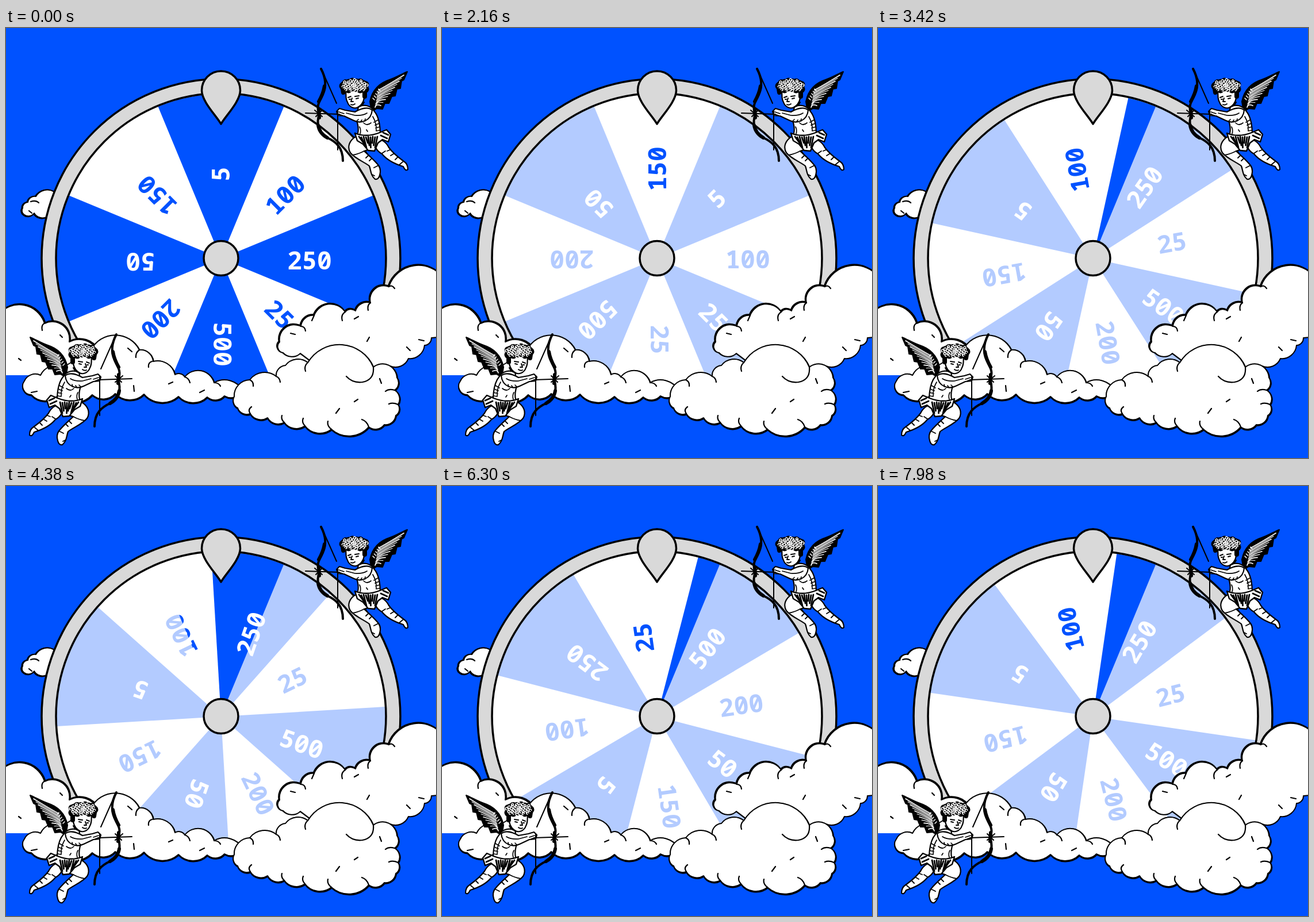
An HTML page for the animation above (8000 ms loop, 748x748 px).

```html
<!DOCTYPE html>
<html lang="en">
<head>
<meta charset="utf-8">
<title>Wheel</title>
<style>
  html, body { margin: 0; width: 100%; height: 100%; overflow: hidden; background: #0052ff; }
  svg { display: block; width: 100vw; height: 100vh; }
  text { font: 600 43px "Noto Sans Mono", monospace; text-anchor: middle; }
  .ink { stroke: #000; stroke-linejoin: round; stroke-linecap: round; }
  .line { fill: none; }
  .skin { fill: #fff; stroke-width: 2.2; }
  .metal { fill: #d9d9d9; stroke: #000; stroke-width: 3.5; }
</style>
</head>
<body>
<svg viewBox="0 0 748 748">
  <defs>
    <clipPath id="aboveClouds"><rect width="748" height="634"/></clipPath>
    <clipPath id="flatBase"><rect width="748" height="604"/></clipPath>
    <g id="cherub" class="ink">
      <g id="wing"></g>
      <!-- far leg, near leg -->
      <path class="skin" d="M640 194C652 191 661 198 666 208C674 219 684 226 692 232Q699 236 699 246Q695 250 691 241C678 237 663 230 654 219C645 214 640 207 640 194Z"/>
      <path class="skin" d="M610 188C597 195 593 207 599 217C607 227 623 233 632 240C635 248 634 256 642 263Q648 264 650 256Q653 246 648 239C640 229 630 221 623 214C635 212 641 201 639 190Z"/>
      <path class="line" stroke-width="1.8" d="M603 221Q614 219 623 214M648 239L640 243M690 233L684 238M654 218L660 214M630 222L626 226M636 227L632 231M668 212L663 214M674 219L669 222M681 225L677 229M637 255L641 257"/>
      <!-- torso -->
      <path class="skin" d="M613 137C623 132 634 135 640 144C648 153 651 169 651 186C640 195 621 196 610 189C615 179 613 169 609 158Z"/>
      <path class="line" stroke-width="1.7" d="M622 165Q628 171 635 165M627 177L629 180M638 154Q645 166 644 178M615 172Q618 177 616 184M647 160L640 164M649 166L642 169M650 172L643 174M650 178L644 179"/>
      <!-- loincloth -->
      <path d="M607 183Q627 191 650 182L662 177L669 185L665 198L655 194L647 200L641 214L630 213L621 202L611 196Z" fill="#fff" stroke-width="2.4"/>
      <path id="folds" class="line" stroke-width="2.8"/>
      <!-- arms -->
      <path class="skin" d="M637 143C629 136 618 140 607 146L590 143L580 140L575 145L577 152L588 153L605 161C617 167 635 162 637 143Z"/>
      <path class="line" stroke-width="1.7" d="M592 148L607 152Q620 153 628 148M579 146L588 149M576 149L585 152M610 162L613 159M617 163L619 160M624 162L625 158"/>
      <!-- head -->
      <path class="skin" d="M591 108C592 116 590 122 594 129C597 138 607 142 614 137Q624 130 624 112L609 102Z"/>
      <path class="line" stroke-width="2" d="M595 121L600 119M607 119L614 118M597 124L599 124M609 123L613 122M602 122L600 128L604 128M600 133Q603 135 607 132M613 137Q620 136 623 129"/>
      <g id="hair"></g>
      <g id="curls" fill="none" stroke="#fff" stroke-width="1.5"></g>
      <!-- bow, string, arrow -->
      <path class="line" stroke-width="4" d="M548 71C555 84 559 99 551 116C545 128 539 136 545 149C540 165 542 180 557 190C573 197 586 207 586 231"/>
      <path class="line" stroke-width="6" d="M554 101Q552 114 544 128M543 169Q545 183 559 191M544 141L545 156"/>
      <path class="line" stroke-width="2" d="M552 79L575 131M577 143L577 212M521 148L580 150M537 143L550 154M539 154L550 143"/>
    </g>
  </defs>
  <rect width="748" height="748" fill="#0052ff"/>
  <g id="backCloud"></g>
  <g clip-path="url(#aboveClouds)">
    <circle class="metal" cx="374" cy="400.500" r="312"/>
    <circle cx="374" cy="400.500" r="287" fill="#fff"/>
    <g transform="translate(0 1)"><g id="wheel"></g></g>
    <path id="veil" fill="#fff" fill-opacity=".7"/>
    <g transform="translate(0 2)" id="labelLayer"></g>
    <circle cx="374" cy="400.500" r="287" fill="none" stroke="#000" stroke-width="3.500"/>
  </g>
  <circle class="metal" cx="374" cy="400.500" r="30"/>
  <path class="metal" stroke-linejoin="round" d="M374 167C367 154 340.500 128 340.500 108.500A33.500 33.500 0 0 1 407.500 108.500C407.500 128 381 154 374 167Z"/>
  <g id="clouds"></g>
  <use href="#cherub"/>
  <use href="#cherub" transform="translate(740 462) scale(-1 1)"/>
</svg>
<script>
const byId = id => document.getElementById(id);
const CX = 374, CY = 400, R = 286;

function add(parent, tag, attrs, text) {
  const el = document.createElementNS('http://www.w3.org/2000/svg', tag);
  for (const k in attrs) el.setAttribute(k, attrs[k]);
  if (text) el.textContent = text;
  return parent.appendChild(el);
}

// Pie slice between two clockwise angles measured from the top.
function slice(from, to) {
  const at = deg => {
    const a = deg * Math.PI / 180;
    return `${CX + R * Math.sin(a)} ${CY - R * Math.cos(a)}`;
  };
  return `M${CX} ${CY}L${at(from)}A${R} ${R} 0 ${+(to - from > 180)} 1 ${at(to)}Z`;
}

// Label, middle radius, sideways shift.
const prizes = [
  ['5', 148, -1], ['100', 158, 0], ['250', 154, 2], ['25', 140, -4],
  ['500', 148, -2], ['200', 148, 0], ['50', 140, -4], ['150', 157, 0]
];
const wheel = byId('wheel');
const labels = add(wheel, 'g', {});
prizes.forEach(([label, radius, shift], i) => {
  const mid = i * 45, blue = i % 2 === 0;
  if (blue) wheel.insertBefore(add(wheel, 'path', { d: slice(mid - 22.5, mid + 22.5), fill: '#0052ff' }), labels);
  add(labels, 'text', {
    y: 15.5, fill: blue ? '#fff' : '#0052ff',
    transform: `rotate(${mid} ${CX} ${CY}) translate(${CX + shift} ${CY - radius}) rotate(-90)`
  }, label);
});
byId('labelLayer').remove();
const veil = byId('veil');
veil.setAttribute('d', slice(22.5, 337.5));

// Cloud outline: bumps between points; "O" is a rounder bump, "L" a straight side.
function bumps(points) {
  let px, py;
  return points.split(' ').map((p, i) => {
    const kind = p.match(/^[LO]/)?.[0];
    const [x, y] = p.replace(/^[LO]/, '').split(',').map(Number);
    const r = (kind === 'O' ? 0.56 : 0.7) * Math.hypot(x - px, y - py);
    px = x; py = y;
    return i === 0 ? `M${x} ${y}` : kind === 'L' ? `L${x} ${y}` : `A${r} ${r} 0 0 1 ${x} ${y}`;
  }).join('') + 'Z';
}

// The offset dark copy makes the outline heavier on one side.
function cloud(parent, points, marks, dx, dy, clip) {
  const g = add(parent, 'g', { class: 'ink', ...(clip && { 'clip-path': `url(#${clip})` }) });
  const d = bumps(points);
  add(g, 'path', { d, 'stroke-width': 3, transform: `translate(${dx} ${dy})` });
  add(g, 'path', { d, fill: '#fff', 'stroke-width': 2 });
  add(g, 'path', { d: marks, fill: 'none', 'stroke-width': 2.2 });
}

cloud(byId('backCloud'), '84,285 L92,325 L72,328 49,322 32,325 29,313 38,303 52,293 84,285',
  'M43 302Q52 299 57 304M40 318L45 322', -1, 0.5);

const clouds = byId('clouds');
cloud(clouds, '-14,500 O67,514 O110,546 160,562 L150,630 L-14,630',
  'M66 514Q61 518 63 526M94 534L98 538M22 575L26 578', 1, -1, 'flatBase');
cloud(clouds, '44,638 O32,614 60,604 100,590 L148,560 O232,560 256,580 294,603 311,607 O362,617 412,631 380,640 350,642 300,641 240,637 190,636 150,638 90,640 44,638',
  'M232 560Q225 565 226 573M212 557L219 563M254 580Q247 582 248 590M283 619L290 616M311 607Q318 609 320 617M362 617Q370 617 373 623M337 634L345 630M222 622L223 632M44 634L54 632', 0.5, 1);
cloud(clouds, '482,565 O476,546 O513,519 536,500 O590,494 608,492 634,478 O666,450 O762,436 L762,537 L740,539 728,552 700,575 668,588 L560,602 L512,566 482,565',
  'M513 519Q520 519 521 527M536 500L532 509M590 494Q582 499 585 509M634 478Q628 482 630 491M666 450Q671 446 676 453M495 531L503 533M606 506L613 502M727 544L718 542M703 561L697 555M632 538L628 545', -1, -1);
cloud(clouds, '397,641 424,612 470,606 486,587 525,582 O639,590 O680,608 676,630 682,655 678,674 658,690 631,694 566,698 520,692 484,686 455,678 425,671 403,661 397,641',
  'M639 590Q641 612 620 616Q603 618 592 606M525 582Q518 588 521 597M470 606Q476 608 477 616M424 612Q431 615 430 623M676 630Q666 627 660 632M682 655Q673 651 666 654M631 694Q628 684 619 681M566 698Q558 692 560 684M520 692Q514 686 517 679M484 686Q478 681 480 674M425 671Q420 664 427 659M580 662L574 670M606 650L612 646M650 610L653 618', 0.5, 1);

// Feathers fan out from the shoulder over a dark wing.
const wing = byId('wing');
add(wing, 'path', {
  d: 'M633 128C637 107 651 95 667 90C679 86 688 80 698 76L692 90L688 92L686 105L680 106L677 118L671 119L666 131L659 131L655 141L645 140L636 146Z',
  fill: '#000', 'stroke-width': 2
});
for (let i = 0; i < 11; i++) {
  const x = 692 - i * 4, y = 82 + i * 5.3;
  const d = `M${648 - i * 0.6} ${108 + i * 3}Q${668 - i * 2.4} ${97 + i * 3.4} ${x} ${y}`;
  add(wing, 'path', { d, fill: 'none', stroke: '#fff', 'stroke-width': i % 2 ? 1.1 : 1.7 });
}
for (let i = 0; i < 5; i++)
  add(wing, 'path', { d: `M${638 + i * 2.5} ${122 - i * 4}l3 3`, stroke: '#fff', 'stroke-width': 1.5 });

// A ragged head of hair: dark tufts, then pale curls.
for (let i = 0; i < 18; i++) {
  const a = i * 0.35;
  add(byId('hair'), 'circle', {
    cx: 606 + 20 * Math.cos(a), cy: 101 + 8 * Math.sin(a) + (i < 6 ? 5 - 2 * i : 0),
    r: 5.5 + i % 2, fill: '#000', stroke: 'none'
  });
}
add(byId('hair'), 'path', { d: 'M624 108L624 119M586 106L587 112', 'stroke-width': 8 });
add(byId('hair'), 'ellipse', { cx: 606, cy: 99, rx: 18, ry: 8 });
for (let i = 0; i < 38; i++) {
  const a = i * 2.4, q = Math.sqrt(i / 38);
  const x = 606 + 23 * q * Math.cos(a), y = 100 + 10 * q * Math.sin(a);
  add(byId('curls'), 'path', { d: `M${x - 2} ${y}q1 -4 4 -1q1 3 -2 3` });
}
let folds = '';
for (let i = 0; i < 9; i++) folds += `M${614 + i * 4} ${189 + i % 2}L${622 + i * 2.5} ${200 + (i % 3) * 4}`;
byId('folds').setAttribute('d', folds + 'M652 187L663 192M656 182L665 186');

// Time in ms, wheel angle, turning speed in degrees per second.
const LOOP = 8000, STEP = 60;
const spin = [
  [0, 0, -165], [1200, -186, -148], [2160, -315, -112], [3420, -415.1, -38],
  [4380, -430.9, -13], [6300, -503, -82], [7980, -779.2, -210]
];

function angleAt(t) {
  let i = 0;
  while (i < spin.length - 2 && t >= spin[i + 1][0]) i++;
  const [t0, a0, v0] = spin[i], [t1, a1, v1] = spin[i + 1];
  const span = (t1 - t0) / 1000, u = (t - t0) / (t1 - t0), w = 1 - u;
  return a0 * w * w * (1 + 2 * u) + a1 * u * u * (3 - 2 * u)
    + span * u * w * (v0 * w - v1 * u);
}

const start = performance.now();
function draw() {
  const elapsed = (performance.now() - start) % LOOP;
  const t = Math.floor(elapsed / STEP) * STEP;
  wheel.setAttribute('transform', `rotate(${angleAt(t)} ${CX} ${CY})`);
  labels.setAttribute('transform', `rotate(${-angleAt(t)} ${CX} ${CY}) translate(0 1) rotate(${angleAt(t)} ${CX} ${CY})`);
  veil.style.display = t < STEP ? 'none' : '';
  requestAnimationFrame(draw);
}
draw();
</script>
</body>
</html>
```
